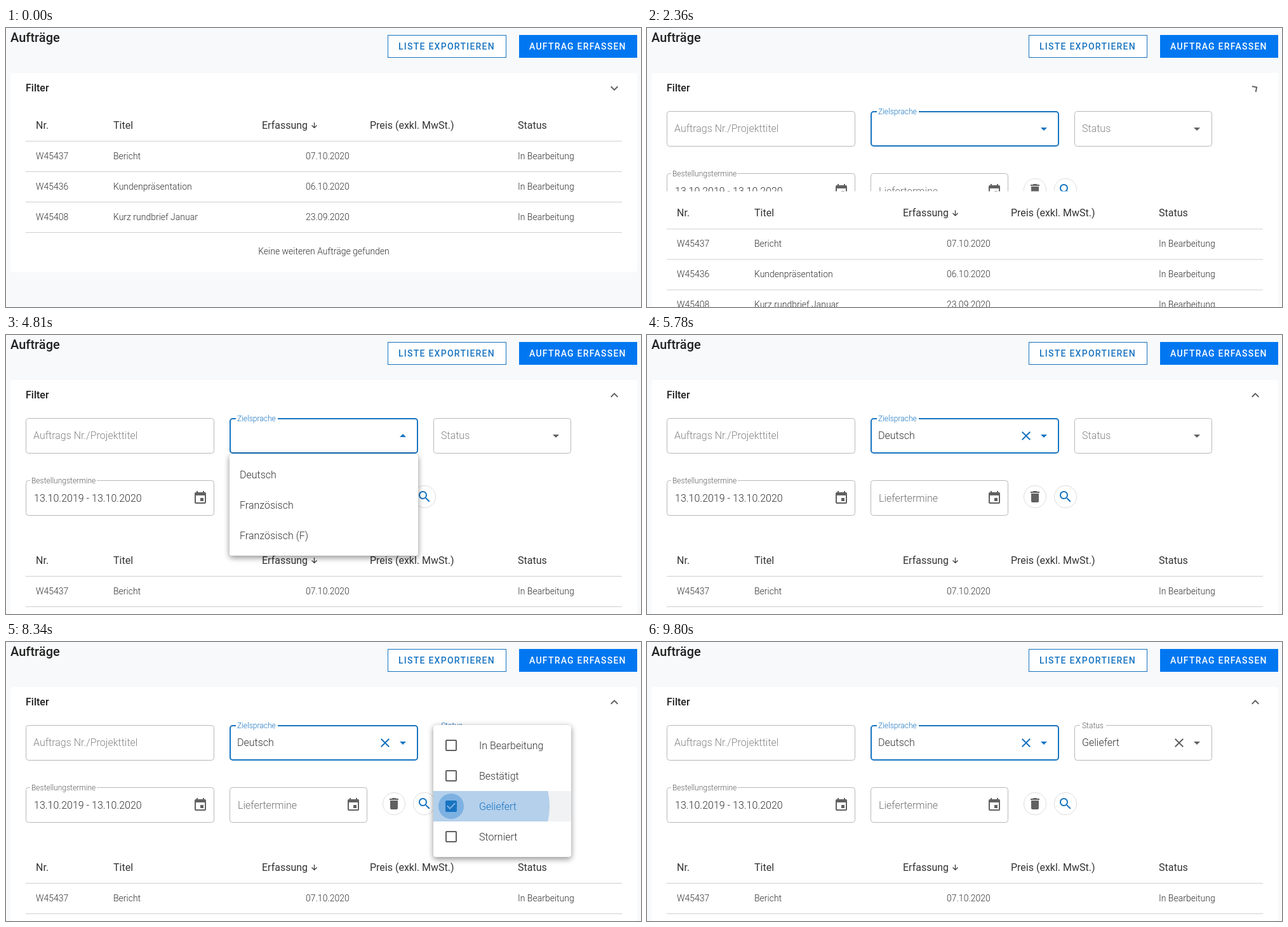
Animation, 1000 px wide and 440 px high, one loop 9.92 s. Source, as an HTML page:

```html
<!DOCTYPE html>
<html lang="de">
<head>
<meta charset="utf-8">
<title>Aufträge</title>
<style>
  html, body { margin: 0; width: 100%; height: 100%; overflow: hidden; background: #f7f9fa; }
  svg { display: block; font-family: Roboto, sans-serif; }
  .shadow { filter: drop-shadow(0 4px 4px #0004) drop-shadow(0 1px 5px #0003); }
</style>
</head>
<body>
<svg id="stage" width="1000" height="440" viewBox="0 0 1000 440"></svg>
<script>
const LOOP = 9920, STEP = 120;
const BLUE = '#1874c0', INK = '#333', GREY = '#616161', HINT = '#858585', BORDER = '#b8b8b8';
const BOX = 'M19,3H5C3.89,3 3,3.89 3,5V19A2,2 0 0,0 5,21H19A2,2 0 0,0 21,19V5C21,3.89 20.1,3 19,3';
const ICONS = {
  chevron: 'M7.41,8.58L12,13.17L16.59,8.58L18,10L12,16L6,10Z',
  triangle: 'M7,10L12,15L17,10Z',
  close: 'M19,6.41L17.59,5L12,10.59L6.41,5L5,6.41L10.59,12L5,17.59L6.41,19L12,13.41L17.59,19L19,17.59L13.41,12Z',
  calendar: 'M19,3H18V1H16V3H8V1H6V3H5A2,2 0 0,0 3,5V19A2,2 0 0,0 5,21H19A2,2 0 0,0 21,19V5A2,2 0 0,0 19,3M19,19H5V8H19M17,12H12V17H17Z',
  trash: 'M19,4H15.5L14.5,3H9.5L8.5,4H5V6H19M6,19A2,2 0 0,0 8,21H16A2,2 0 0,0 18,19V7H6Z',
  search: 'M15.5,14H14.7L14.4,13.7A6.5,6.5 0 1,0 13.7,14.4L14,14.7V15.5L19,20.5L20.5,19ZM9.5,14A4.5,4.5 0 1,1 9.5,5A4.5,4.5 0 1,1 9.5,14Z',
  unchecked: BOX + 'M19,5V19H5V5Z',
  checked: 'M10,17L5,12L6.41,10.58L10,14.17L17.59,6.58L19,8M' + BOX.slice(1) + 'Z'
};
const ROWS = [
  ['W45437', 'Bericht', '07.10.2020'],
  ['W45436', 'Kundenpräsentation', '06.10.2020'],
  ['W45408', 'Kurz rundbrief Januar', '23.09.2020']
];
const LANGUAGES = ['Deutsch', 'Französisch', 'Französisch (F)'];
const STATES = ['In Bearbeitung', 'Bestätigt', 'Geliefert', 'Storniert'];

let now = 0;
const clamp = v => Math.max(0, Math.min(1, v));
const age = start => Math.floor((now - start) / STEP) * STEP;
const ease = start => now < start ? 0 : 1 - (1 - clamp((age(start) + 96) / 300)) ** 3;
const between = (start, end) => ease(start) - ease(end);

const text = (x, y, str, size = 16, fill = INK, weight = 300, extra = '') =>
  `<text x="${x}" y="${y}" font-size="${size}" font-weight="${weight}" fill="${fill}" ${extra}>${str}</text>`;
const rect = (x, y, w, h, fill, extra = '') =>
  `<rect x="${x}" y="${y}" width="${w}" height="${h}" fill="${fill}" ${extra}/>`;
const circle = (x, y, r, fill, extra = '') =>
  `<circle cx="${x}" cy="${y}" r="${r}" fill="${fill}" ${extra}/>`;
const icon = (name, x, y, fill = GREY, turn = 0) =>
  `<path d="${ICONS[name]}" fill="${fill}" fill-rule="evenodd" transform="translate(${x} ${y}) rotate(${turn}) translate(-12 -12)"/>`;
const outline = (x, y, w, stroke = BORDER, width = 1, opacity = 1) =>
  rect(x + width / 2, y + width / 2, w - width, 56 - width, 'none',
    `rx="4" stroke="${stroke}" stroke-width="${width}" opacity="${opacity}"`);
const notch = (x, y, w) => rect(x, y - 1, w, 4, '#fff');
const group = (content, attrs) => `<g ${attrs}>${content}</g>`;

function header() {
  const button = 'letter-spacing="1.25"';
  return text(7, 22, 'Aufträge', 20, '#212121', 500) +
    rect(601.5, 11.5, 186, 35, '#fff', `stroke="${BLUE}"`) +
    text(618, 34, 'LISTE EXPORTIEREN', 14, BLUE, 500, button) +
    rect(808, 11, 186, 36, '#0077f0') +
    text(824, 34, 'AUFTRAG ERFASSEN', 14, '#fff', 500, button);
}

function table() {
  let out = text(47, 159, 'Nr.', 16, INK, 400) + text(169, 159, 'Titel', 16, INK, 400) +
    text(403, 159, 'Erfassung', 16, INK, 400) + text(573, 159, 'Preis (exkl. MwSt.)', 16, INK, 400) +
    text(806, 159, 'Status', 16, INK, 400) +
    `<path d="M485.5,149V157M481.5,153.5L485.5,157.5L489.5,153.5" fill="none" stroke="${INK}" stroke-width="1.2"/>`;
  if (now >= 1120 && now < 1240) out += rect(31, 227, 939, 47, '#ededed');
  ROWS.forEach(([nr, title, date], i) => {
    const y = 207 + 48 * i;
    out += text(47, y, nr, 14) + text(169, y, title, 14) + text(472, y, date, 14) +
      text(806, y, 'In Bearbeitung', 14);
  });
  for (let y = 178; y < 330; y += 48) out += rect(31, y, 939, 1, '#cfcfcf');
  return out + text(500.5, 357, 'Keine weiteren Aufträge gefunden', 14, INK, 300, 'text-anchor="middle"');
}

function languageField() {
  const turn = 180 * between(4200, 5540);
  let out = outline(352, 131, 297, BLUE, 2) + notch(362, 131, 66) +
    text(364, 136, 'Zielsprache', 12, BLUE) + icon('triangle', 625, 159, BLUE, turn);
  if (now >= 4930) out += text(364, 164, 'Deutsch') + icon('close', 597, 159, BLUE);
  return out;
}

function statusField() {
  const lift = ease(6750), focus = between(6750, 9560);
  const hover = between(3100, 3590) + between(5900, 9560);
  const tint = focus > .5 ? BLUE : GREY;
  let out = outline(673, 131, 217) + outline(673, 131, 217, INK, 1, hover) +
    outline(673, 131, 217, BLUE, focus > .9 ? 2 : 1, focus) + notch(682, 131, 41 * lift) +
    text(685, 164 - 28 * lift, 'Status', 16 - 4 * lift, lift ? tint : HINT) +
    icon('triangle', 866, 159, tint, 180 * between(6750, 9440));
  if (now >= 8340) out += text(685, 164, 'Geliefert') + icon('close', 838, 159, tint);
  return out;
}

function filters() {
  const ring = x => circle(x, 255, 17.5, '#fff', 'stroke="#dcdcdc"');
  return outline(31, 131, 297) + text(43, 164, 'Auftrags Nr./Projekttitel', 16, HINT) +
    languageField() + statusField() +
    outline(31, 229, 297) + notch(38, 229, 105) + text(40, 234, 'Bestellungstermine', 12, GREY) +
    text(44, 263, '13.10.2019 - 13.10.2020') + icon('calendar', 306, 257) +
    outline(352, 229, 217) + text(365, 263, 'Liefertermine', 16, '#707070') + icon('calendar', 547, 257) +
    ring(611) + icon('trash', 611, 255) + ring(659) + icon('search', 659, 255, BLUE);
}

function ripple(start, x, y, clip, length) {
  if (now < start) return '';
  const t = age(start), opacity = .28 * clamp((length - t) / 240);
  return circle(x, y, 104 + 1.6 * t, '#1976d2', `opacity="${opacity}" clip-path="url(#${clip})"`);
}

function languageMenu() {
  const chosen = now >= 4930;
  return group(
    rect(352, 188, 297, 160, '#fff', 'rx="4" class="shadow"') +
    (chosen ? rect(352, 196, 297, 48, '#e6eff8') : '') +
    ripple(4930, 420, 220, 'language', 360) +
    LANGUAGES.map((name, i) => text(368, 226 + 48 * i, name, 16, chosen && !i ? BLUE : INK)).join(''),
    `opacity="${between(4320, 5540)}"`);
}

function statusMenu() {
  const hovers = [between(6870, 7360), between(7360, 7850), ease(7850), 0];
  let out = rect(673, 131, 217, 208, '#fff', 'rx="4" class="shadow"');
  STATES.forEach((name, i) => {
    const y = 163 + 48 * i, checked = i === 2 && now >= 8340;
    out += rect(673, y - 24, 217, 48, '#f0f2f3', `opacity="${hovers[i]}"`);
    if (checked) out += ripple(8340, 752, y, 'status', 480) +
      circle(701, y, 20, '#1976d2', `opacity="${.35 * clamp((480 - age(8340)) / 360)}"`);
    out += icon(checked ? 'checked' : 'unchecked', 701, y, checked ? BLUE : GREY) +
      text(745, y + 6, name, 16, checked ? BLUE : INK);
  });
  return group(out, `opacity="${between(6870, 9440)}"`);
}

function scene() {
  const open = ease(2360), shift = 202 * open;
  const clip = (id, x, y, w, h) => `<clipPath id="${id}">${rect(x, y, w, h, '#000')}</clipPath>`;
  return clip('panel', 0, 119, 1000, shift) + clip('language', 352, 196, 297, 48) +
    clip('status', 673, 235, 217, 48) +
    header() + rect(7, 71, 987, 314 + shift, '#fff', 'rx="4"') +
    text(31, 100, 'Filter', 16, '#212121', 500) + icon('chevron', 958, 95, GREY, -180 * open) +
    (open ? group(filters(), 'clip-path="url(#panel)"') : '') +
    group(table(), `transform="translate(0 ${shift})"`) +
    languageMenu() + statusMenu();
}

const stage = document.getElementById('stage');
const begin = performance.now();
let shown = '';
function draw() {
  now = (performance.now() - begin) % LOOP;
  const markup = scene();
  if (markup !== shown) stage.innerHTML = shown = markup;
  requestAnimationFrame(draw);
}
draw();
</script>
</body>
</html>
```
